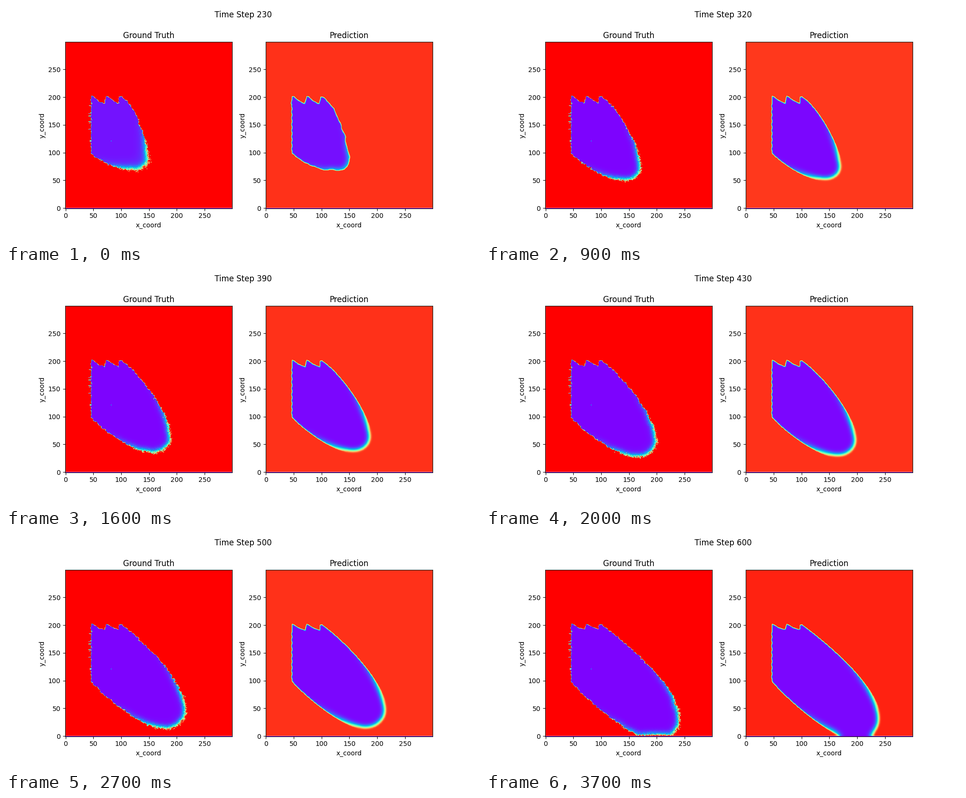
Recreate the animation shown at these times as a matplotlib script. Size 1000 px wide and 500 px high, loop 3800 ms.

```python
import numpy as np
import matplotlib.pyplot as plt
from matplotlib.animation import FuncAnimation
from matplotlib.path import Path

N = 300
FRAMES = 38
Y, X = np.mgrid[0:N, 0:N].astype(float)
BOX = (X > 35) & (X < 250) & (Y < 210)
SHOULDER, CORNER = (100, 201), (46, 99.5)


def gauss(sigma):
    i = np.arange(N)
    k = np.exp(-0.5 * ((i[:, None] - i) / sigma) ** 2)
    return k / k.sum(axis=1, keepdims=True)


KERNELS = {s: gauss(s) for s in (0.9, 1.5, 4, 5, 6, 12)}


def blur(a, sigma):
    k = KERNELS[sigma]
    return k @ a @ k.T


def smooth_noise(sigma):
    a = blur(rng.normal(size=(N, N)), sigma)
    return a / a.std()


rng = np.random.default_rng(7)
GRAIN_X, GRAIN_Y = rng.normal(size=(2, N, N))
ROUGH_X, ROUGH_Y = smooth_noise(1.5), smooth_noise(1.5)
WAVE_X, WAVE_Y = smooth_noise(4), smooth_noise(4)
SPECKLE = rng.random((N, N))

# The straight left side is ragged in one panel and wavy in the other
LEFT = (X < 60) & (Y > 98) & (Y < 188)
RAGGED = rng.normal(0, 0.6, (N, 1)) - 4 * (rng.random((N, 1)) < 0.07)
WAVY = 0.9 * np.sin(Y * 2 * np.pi / 11)


def bezier(*pts, n=24):
    a, b, c, d = np.array(pts, float)
    t = np.linspace(0, 1, n)[:, None]
    s = 1 - t
    return s**3 * a + 3 * s * s * t * b + 3 * s * t * t * c + t**3 * d


def tooth(x, u):
    return [(x - 1, 200), (x, 202), (x + 3, 201),
            (x + 11, 194 + 2 * u), (x + 23, 188 + 4 * u)]


def plume(i):
    """Outline and centre of the advancing nose; both extremes move steadily."""
    u = i / (FRAMES - 1)
    tx, ty = 150 + 2.46 * i, 88 - 1.55 * i
    bx, by = 126 + 1.95 * i, 68 - 2.05 * i
    upper = bezier(SHOULDER, (127 + 0.35 * i, 186 - 0.38 * i),
                   (tx - 4 * (1 - u), ty + 30 + 0.78 * i), (tx, ty))
    a = np.linspace(0, np.pi / 2, 16)
    nose = np.column_stack([bx + (tx - bx) * np.cos(a), ty + (by - ty) * np.sin(a)])
    lower = bezier((bx, by), (bx - 34 - 0.27 * i, by), (64, 83 - 0.2 * i), CORNER)
    path = np.vstack([upper, nose, lower, tooth(47, u), tooth(73, u),
                      (96.5, 200), SHOULDER])
    return Path(path), nose.mean(axis=0)


def inside(path, dx, dy):
    m = np.zeros((N, N))
    m[BOX] = path.contains_points(np.column_stack([(X - dx)[BOX], (Y - dy)[BOX]]))
    return m


def framed(field):
    """Faint rim on three sides, empty bottom row."""
    field[-1] = field[:, 0] = field[:, -1] = 0.75
    field[0] = 0
    return field


def truth(path, near, early):
    amp = 0.35 + near * (1.1 + 0.5 * early)
    dx = np.where(LEFT, RAGGED, amp * GRAIN_X + 0.7 * ROUGH_X)
    dy = np.where(LEFT, 0, amp * GRAIN_Y + 0.7 * ROUGH_Y)
    dy = np.where((Y > 186) & (X < 105), 0.3 * ROUGH_Y, dy)
    m = inside(path, dx, dy) * (Y > 2.5 + GRAIN_Y)
    edge = np.clip(2 * (1 - blur(m, 5)), 0, 1)
    glow = near * edge * (0.3 + 0.45 * SPECKLE)
    haze = near * (1 - blur(m, 12)) * (0.05 + 0.15 * early)
    field = np.where(m > 0, 0.004 + 0.02 * early + glow + haze, 1.0)
    field[121, 82] = 0.4
    return framed(field)


def prediction(path, near, early, level):
    dx = np.where(LEFT, WAVY, 0.9 * early * WAVE_X)
    dy = np.where(LEFT | (Y > 186), 0, 0.9 * early * WAVE_Y)
    m = inside(path, dx, dy)
    sharp = np.clip(1.3 * (1 - blur(m, 0.9)), 0, 1)
    soft = blur(np.clip(2 * (1 - blur(m, 6)), 0, 1) ** 1.3, 1.5)
    mix = near * (1 - 0.7 * early)
    base = 0.008 + 0.012 * early
    return framed(base + (level - base) * (sharp + mix * (soft - sharp)))


def fields(i):
    early = max(0, 1 - i / 5)
    path, (cx, cy) = plume(i)
    reach = 42 + 0.8 * i
    near = np.exp(-((X - cx) ** 2 + (Y - cy) ** 2) / reach ** 2)
    near = np.minimum(1, 1.4 * near)
    level = np.interp(i, (0, 5, 12, 30, 36), (0.936, 0.920, 0.935, 0.937, 0.955))
    return truth(path, near, early), prediction(path, near, early, level)


fig, axes = plt.subplots(1, 2, figsize=(10, 5), dpi=100)
heading = fig.suptitle("Time Step 230")
images = []
for ax, name in zip(axes, ("Ground Truth", "Prediction")):
    images.append(ax.imshow(np.ones((N, N)), cmap="rainbow", origin="lower",
                            vmin=0, vmax=1))
    ax.set(title=name, xlabel="x_coord", ylabel="y_coord")


def update(i):
    heading.set_text(f"Time Step {230 + 10 * i}")
    for image, field in zip(images, fields(i)):
        image.set_data(field)
    return images


anim = FuncAnimation(fig, update, frames=FRAMES, interval=100, repeat=True,
                     repeat_delay=0)
plt.show()
```
